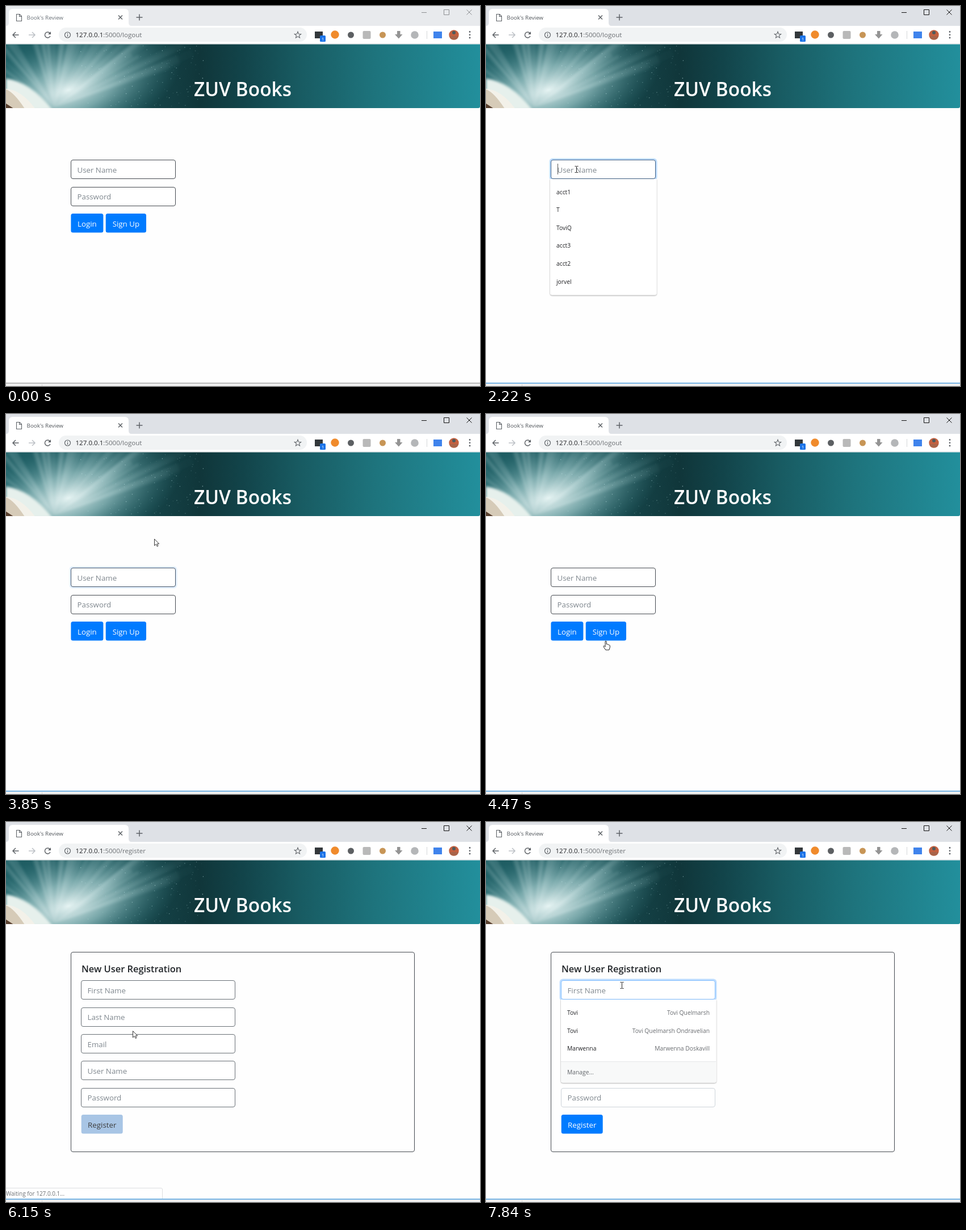
These frames come from a looping animation (835x670 px, 8 s). An HTML page:

```html
<!DOCTYPE html>
<html lang="en">
<head>
<meta charset="utf-8">
<title>Book's Review</title>
<style>
  html, body { margin: 0; width: 100%; height: 100%; overflow: hidden; background: #fff; }
  svg { display: block; width: 835px; height: 670px; font-family: "Open Sans", "Noto Sans", sans-serif; }
  .ui { font-size: 10.3px; }
  .form { font-size: 13.3px; }
  .line { fill: none; stroke: #5f6368; stroke-width: 1.5; }
</style>
</head>
<body>
<svg id="stage" viewBox="0 0 835 670" xmlns="http://www.w3.org/2000/svg">
  <defs>
    <linearGradient id="teal">
      <stop offset="0" stop-color="#1f5f65"/><stop offset=".2" stop-color="#1b5257"/>
      <stop offset=".41" stop-color="#10363a"/><stop offset=".5" stop-color="#12444a"/>
      <stop offset=".62" stop-color="#185b62"/><stop offset=".78" stop-color="#1e747d"/>
      <stop offset="1" stop-color="#228f9c"/>
    </linearGradient>
    <radialGradient id="glow">
      <stop offset="0" stop-color="#eefaf9" stop-opacity=".95"/>
      <stop offset=".4" stop-color="#a9d3d4" stop-opacity=".65"/>
      <stop offset="1" stop-color="#3b868c" stop-opacity="0"/>
    </radialGradient>
    <radialGradient id="rayFade" gradientUnits="userSpaceOnUse" cx="85" cy="178" r="290">
      <stop offset="0" stop-color="#fff" stop-opacity=".5"/><stop offset="1" stop-color="#9fdcdc" stop-opacity="0"/>
    </radialGradient>
    <filter id="soft"><feGaussianBlur stdDeviation="2"/></filter>
    <filter id="shadow" x="-10%" y="-10%" width="120%" height="125%">
      <feDropShadow dx="0" dy="1" stdDeviation="1.3" flood-opacity=".4"/>
    </filter>
    <clipPath id="bannerClip"><path d="M0 67.5H835V177Q835 180 832 180H0Z"/></clipPath>
  </defs>

  <rect width="835" height="670" fill="#fefefe"/>
  <rect id="tabStrip" width="835" height="35"/>
  <path d="M0 35Q5 35 5 29V12Q5 5 12 5H209Q216 5 216 12V29Q216 35 221 35Z" fill="#fff"/>
  <path id="docIcon" d="M18.5 14.5H24L27.5 18V26.5H18.5ZM23.5 14.5V18.5H27.5" class="line" style="stroke-width:1.1"/>
  <path id="spinner" d="M23 15.5A5 5 0 1 1 18 20.5" class="line" style="stroke:#8a8d91"/>
  <text id="tabTitle" x="36.5" y="24" font-size="9.85">Book's Review</text>
  <path d="M198 16.5L205 23.5M205 16.5L198 23.5M229.5 20H240.5M235 14.5V25.5" class="line"/>
  <path id="windowButtons" d="M732 11.5H741M771.5 6.5H780.5V15.5H771.5ZM811.5 6.5L820.5 15.5M820.5 6.5L811.5 15.5" fill="none"/>

  <rect y="35" width="835" height="32" fill="#fff"/>
  <path d="M0 66.500H835" stroke="#e4e5e7"/>
  <path d="M22.5 51H12.5M17 46L12 51L17 56" class="line"/>
  <path d="M40 51H50M46 46L51 51L46 56" class="line" style="stroke:#bdc1c6"/>
  <g id="reload"><path d="M77.3 47.8A5 5 0 1 0 78 53" class="line"/><path d="M79 45V50H74Z" fill="#5f6368"/></g>
  <path id="stop" d="M69 47L78 56M78 47L69 56" class="line"/>
  <rect x="93" y="38" width="437" height="25" rx="12.5" fill="#f1f3f4"/>
  <circle cx="108.5" cy="51" r="5" class="line" style="stroke-width:1.2"/>
  <path d="M108.5 47.8V49.2M108.5 50.3V54" class="line" style="stroke-width:1.2"/>
  <text x="122.5" y="55" font-size="11.55" fill="#202124">127.0.0.1<tspan fill="#6b6f73">:5000/<tspan id="route"></tspan></tspan></text>
  <path id="star" class="line" style="stroke-width:1.1"/>
  <g id="extensions">
    <rect x="544" y="45" width="14" height="12" fill="#33383b"/>
    <rect x="553" y="52" width="10" height="11" rx="1.5" fill="#1a73e8"/>
    <text x="558" y="60.5" font-size="8" fill="#fff" text-anchor="middle">1</text>
    <circle cx="579.5" cy="50.5" r="7.2" fill="#f08b2c"/>
    <circle cx="607.5" cy="51" r="5.5" fill="#5c5f62"/>
    <rect x="628.5" y="44" width="14" height="14" rx="2" fill="#b9b9b9"/>
    <circle cx="663.5" cy="51" r="5.5" fill="#c79556"/>
    <path d="M689 44H694.5V50H698.5L691.8 57.5L685 50H689Z" fill="#949494"/>
    <circle cx="720" cy="51" r="6.8" fill="#b4b6b8"/>
    <path d="M741.5 44V58" stroke="#d5d7da"/>
    <rect x="753" y="45" width="15" height="12" fill="#3f83ec"/>
    <circle cx="789" cy="51" r="8.7" fill="#c4603f"/>
    <path d="M781 54Q789 51 797 54A8.7 8.7 0 0 1 781 54Z" fill="#a8644a"/>
    <circle cx="789" cy="47" r="3" fill="#4f5a5c"/>
    <path d="M817 45.5h.01M817 50.8h.01M817 56h.01" stroke="#5f6368" stroke-width="2.8" stroke-linecap="round"/>
  </g>

  <g clip-path="url(#bannerClip)">
    <rect y="67" width="835" height="113" fill="url(#teal)"/>
    <ellipse cx="110" cy="148" rx="205" ry="100" fill="url(#glow)" transform="rotate(-18 110 148)"/>
    <g id="rays" fill="url(#rayFade)" filter="url(#soft)"></g>
    <g id="specks" fill="#bfe6e6"></g>
    <path d="M0 128Q42 133 82 183H0Z" fill="#e6f0ec" filter="url(#soft)"/>
    <path d="M0 146Q28 148 52 182H0Z" fill="#f3f1e9"/>
    <path d="M0 147Q14 152 33 181H0Z" fill="#d6cbb8"/>
    <path d="M0 172L14 181H0Z" fill="#59402e"/>
  </g>
  <text x="417" y="159" font-size="33.5" font-weight="600" fill="#fff" text-anchor="middle">ZUV Books</text>

  <g id="loginPage" class="form"></g>
  <g id="registerPage" class="form">
    <rect x="114.5" y="229.5" width="605" height="352" rx="3.5" fill="none" stroke="#454a50"/>
    <text x="133" y="265" font-size="16.4" font-weight="600" fill="#212529">New User Registration</text>
  </g>
  <path id="caret" stroke="#555"/>
  <g id="userMenu" class="ui" fill="#202124"><path d="M113 305H300.5V506Q300.5 509.500 297 509.500H117Q113 509.500 113 506Z" fill="#fff" filter="url(#shadow)"/></g>
  <g id="nameMenu" class="ui" fill="#202124">
    <path d="M132 313H405.500V456Q405.500 459.500 402 459.500H136Q132 459.500 132 456Z" fill="#fff" filter="url(#shadow)"/>
    <path d="M132 423H405.500V456Q405.500 459.500 402 459.500H136Q132 459.500 132 456Z" fill="#f8f9f9"/>
    <path d="M132 422.500H405" stroke="#e6e7e8"/>
    <text x="143" y="445" fill="#5f6368">Manage...</text>
  </g>
  <g id="tooltip">
    <rect x="239" y="295" width="116" height="18" fill="#9b9b9b" opacity=".8"/>
    <rect x="237.500" y="293.500" width="115" height="17" fill="#fff" stroke="#7a7a7a"/>
    <text x="241" y="306" font-size="10.1" fill="#686868">Please fill out this field.</text>
  </g>
  <g id="status">
    <path d="M-1 645.500H273Q275.500 645.500 275.500 648V665H-1Z" fill="#fff" stroke="#dcdee0"/>
    <text x="0" y="659" font-size="9.95" fill="#6b6f73">Waiting for 127.0.0.1...</text>
  </g>
  <rect y="666" width="835" height="4" fill="#f0f0f0"/>
  <path d="M63.500 667V670" stroke="#d5d5d5"/>
  <rect id="windowEdge" y="664" width="835" height="2"/>

  <g id="cursor">
    <path id="arrow" d="M.5 .5V12L3.300 9.500L5.200 13.500L7 12.700L5.200 8.900H8.700Z" fill="#fff" stroke="#222" stroke-width=".9"/>
    <path id="ibeam" d="M-3 -5.500H-1Q0 -5.500 0 -4.500V4.500Q0 5.500 -1 5.500H-3M3 -5.500H1Q0 -5.500 0 -4.500M0 4.500Q0 5.500 1 5.500H3" fill="none" stroke="#222"/>
    <path id="hand" d="M-1 1Q0 -.7 1.200 1V6L2.500 5.700Q3.600 5.700 3.800 6.700Q5.300 6.200 5.700 7.300Q7.300 7 7.300 8.600V11.500L5.800 16H-.2L-3.500 11.200Q-4.800 9 -3.300 8.700Q-2.500 8.500 -1 10.500Z" fill="#fff" stroke="#222"/>
  </g>
</svg>
<script>
const LOOP = 8000;
const ACTIVATE = 2070, BLUR = 3690, HOVER = 4470, CLICK = 4950, LOADING = 5030;
const COMMIT = 6060, PAINT = 6150, LOADED = 6370, NAME_FOCUS = 7300;
const PITCH = 47.4, BASELINE = 22.6;

const $ = id => document.getElementById(id);
const clamp = v => Math.max(0, Math.min(1, v));
const fade = (t, start) => clamp((t - start) / 150);
const show = (id, on) => $(id).setAttribute('visibility', on ? 'visible' : 'hidden');
const within = (t, a, b) => t >= a && t < b;

function mix(from, to, k) {
  const part = (c, i) => parseInt(c.substr(1 + 2 * i, 2), 16);
  return `rgb(${[0, 1, 2].map(i => Math.round(part(from, i) + (part(to, i) - part(from, i)) * k))})`;
}

function add(parent, tag, attrs, text) {
  const node = document.createElementNS('http://www.w3.org/2000/svg', tag);
  for (const key in attrs) node.setAttribute(key, attrs[key]);
  if (text) node.textContent = text;
  return parent.appendChild(node);
}

let seed = 11;
const random = () => (seed = seed * 16807 % 2147483647) / 2147483647;

// Light bursting out of the book, mostly up and to the right
for (let i = 0; i < 40; i++) {
  const a = -2.5 + 2.15 * random(), spread = .01 + .035 * random(), r = 150 + 150 * random();
  const at = b => `${85 + r * Math.cos(b)} ${178 + r * Math.sin(b)}`;
  add($('rays'), 'path', { d: `M85 178L${at(a - spread)}L${at(a + spread)}Z`, opacity: .2 + .4 * random() });
}
for (let i = 0; i < 150; i++) {
  add($('specks'), 'circle', {
    cx: 130 + 220 * random(), cy: 70 + 108 * random(), r: .3 + .5 * random(), opacity: .2 + .5 * random()
  });
}
const starPoints = Array.from({ length: 10 }, (_, i) => {
  const a = -Math.PI / 2 + i * Math.PI / 5, r = i % 2 ? 2.6 : 6;
  return `${514 + r * Math.cos(a)} ${51.3 + r * Math.sin(a)}`;
});
$('star').setAttribute('d', `M${starPoints.join('L')}Z`);

// Boxes and baselines snap to whole pixels
function makeField(page, label, x, top, w) {
  const y = Math.round(top);
  const ring = add(page, 'rect', { x: x - 2.5, y: y - 2.5, width: w + 6, height: 39, rx: 6, fill: '#bfdeff', opacity: 0 });
  const box = add(page, 'rect', { x: x + .5, y: y + .5, width: w, height: 33, rx: 3.5, fill: '#fff', stroke: '#454a50' });
  add(page, 'text', { x: x + 11.5, y: Math.round(top + BASELINE), fill: '#7f878e' }, label);
  return { x, y, w, h: 34, ring, box };
}

function makeButton(page, label, x, y, w) {
  const ring = add(page, 'rect', { x: x - 3, y: y - 3, width: w + 6, height: 39.5, rx: 6, fill: '#80bdff', opacity: 0 });
  const box = add(page, 'rect', { x, y, width: w, height: 33.5, rx: 3.5, fill: '#007bff' });
  const text = add(page, 'text', { x: x + w / 2, y: Math.round(y + BASELINE), fill: '#fff', 'text-anchor': 'middle' }, label);
  return { x, y, w, h: 33.5, ring, box, text };
}

const login = $('loginPage'), register = $('registerPage');
const loginFields = ['User Name', 'Password'].map((label, i) => makeField(login, label, 114, 271.2 + PITCH * i, 184));
const loginButtons = [makeButton(login, 'Login', 114.4, 366, 57), makeButton(login, 'Sign Up', 175.7, 366, 71.3)];
const signUp = loginButtons[1];
const newFields = ['First Name', 'Last Name', 'Email', 'User Name', 'Password']
  .map((label, i) => makeField(register, label, 132, 279.2 + PITCH * i, 271));
const registerButton = makeButton(register, 'Register', 132.7, 516, 73);

['acct1', 'T', 'ToviQ', 'acct3', 'acct2', 'jorvel'].forEach((name, i) =>
  add($('userMenu'), 'text', { x: 124, y: 331.5 + 31.6 * i }, name));
[['Tovi', 'Tovi Quelmarsh'], ['Tovi', 'Tovi Quelmarsh Ondravelian'], ['Marwenna', 'Marwenna Doskavill']]
  .forEach(([first, full], i) => {
    const y = 340 + 31.6 * i;
    add($('nameMenu'), 'text', { x: 143, y }, first);
    add($('nameMenu'), 'text', { x: 394, y, fill: '#686b6f', 'text-anchor': 'end' }, full);
  });

const bursts = [
  [300, 470, 3], [700, 760, 2], [900, 940, 2], [1080, 1310, 4], [1470, 1780, 5], [2070, 2220, 3],
  [2630, 2630, 1], [3080, 3310, 4], [3540, 4320, 11], [4410, 4470, 2], [4560, 5200, 9],
  [5260, 6060, 11], [6150, 6910, 11], [7150, 7540, 6], [7840, 7840, 1]
];
const refreshes = bursts.flatMap(([a, b, n]) =>
  Array.from({ length: n }, (_, i) => a + (b - a) * i / Math.max(1, n - 1)));
const heldTime = t => refreshes.reduce((last, r) => r <= t ? r : last, 0);

// Pointer: time, x, y
const path = [
  [300, 632, 653], [385, 350, 545], [470, 116, 430], [700, 82, 392], [760, 50, 353], [900, 46, 318],
  [940, 43, 284], [1080, 62, 272], [1157, 96, 265], [1233, 132, 272], [1310, 149, 274], [1470, 150, 276],
  [1780, 159, 288], [3000, 159, 288], [3157, 210, 262], [3310, 261, 231], [3540, 261, 226], [3618, 261, 220],
  [3850, 261, 220], [4086, 274, 300], [4242, 258, 405], [4320, 236, 418], [4410, 217, 407], [4470, 211, 399.5],
  [4560, 213, 391], [4800, 223, 368], [6226, 223, 368], [6600, 236, 305], [6910, 239, 288]
];

function pointerAt(t) {
  const next = path.findIndex(key => key[0] > t);
  if (next < 0) return path[path.length - 1].slice(1);
  const [t0, x0, y0] = path[Math.max(0, next - 1)], [t1, x1, y1] = path[next];
  const k = clamp((t - t0) / (t1 - t0 || 1));
  return [x0 + (x1 - x0) * k, y0 + (y1 - y0) * k];
}

function drawPointer(t, registering) {
  const [x, y] = pointerAt(t);
  const over = list => list.some(b => x >= b.x && x <= b.x + b.w && y >= b.y && y <= b.y + b.h);
  const kind = over(registering ? newFields : loginFields) ? 'ibeam'
    : over(registering ? [registerButton] : loginButtons) ? 'hand' : 'arrow';
  const nudge = kind === 'ibeam' ? .5 : 0;
  $('cursor').setAttribute('transform', `translate(${Math.round(x) + nudge} ${Math.round(y)})`);
  for (const id of ['arrow', 'ibeam', 'hand']) show(id, t >= 300 && id === kind);
}

function drawCaret(t) {
  const second = t >= NAME_FOCUS;
  const focused = second || within(t, ACTIVATE, BLUR);
  const lit = Math.floor((t - (second ? NAME_FOCUS : ACTIVATE)) / 530) % 2 === 0;
  show('caret', focused && lit);
  $('caret').setAttribute('d', second ? 'M144.5 286V306' : 'M126.5 278V297');
}

function render(now) {
  const t = heldTime(now);
  const active = t >= ACTIVATE, registering = t >= PAINT, loading = within(t, LOADING, PAINT);

  $('tabStrip').setAttribute('fill', active ? '#dee1e6' : '#e8eaed');
  $('tabTitle').setAttribute('fill', active ? '#50555a' : '#697077');
  $('windowButtons').setAttribute('stroke', active ? '#111' : '#8d8f92');
  $('windowEdge').setAttribute('fill', active ? '#78b4e3' : '#b9b9b9');
  $('route').textContent = t >= COMMIT ? 'register' : 'logout';

  show('docIcon', !loading);
  show('spinner', loading);
  $('spinner').setAttribute('transform', `rotate(${-(t - LOADING) * .36} 23 20.5)`);
  show('reload', !loading);
  show('stop', loading);
  show('status', within(t, LOADING, LOADED));
  show('loginPage', !registering);
  show('registerPage', registering);

  const userFocus = fade(t, ACTIVATE) - fade(t, BLUR);
  loginFields[0].ring.setAttribute('opacity', userFocus);
  loginFields[0].box.setAttribute('stroke', mix('#454a50', '#3e5f85', userFocus));
  signUp.box.setAttribute('fill', mix('#007bff', '#0069d9', fade(t, HOVER)));
  signUp.ring.setAttribute('opacity', fade(t, CLICK));
  show('userMenu', within(t, ACTIVATE + 70, BLUR));

  const settle = fade(t, PAINT - 36), nameFocus = fade(t, NAME_FOCUS);
  newFields.forEach(f => f.box.setAttribute('stroke', mix('#495057', '#ced4da', settle)));
  if (nameFocus) newFields[0].box.setAttribute('stroke', mix('#ced4da', '#80bdff', nameFocus));
  newFields[0].ring.setAttribute('opacity', nameFocus);
  registerButton.box.setAttribute('fill', mix('#dddddd', '#007bff', settle));
  registerButton.text.setAttribute('fill', mix('#000000', '#ffffff', settle));
  show('tooltip', within(t, 7200, NAME_FOCUS));
  show('nameMenu', t >= NAME_FOCUS + 150);

  drawCaret(t);
  drawPointer(t, registering);
}

function tick() {
  render(performance.now() % LOOP);
  requestAnimationFrame(tick);
}
tick();
</script>
</body>
</html>
```
